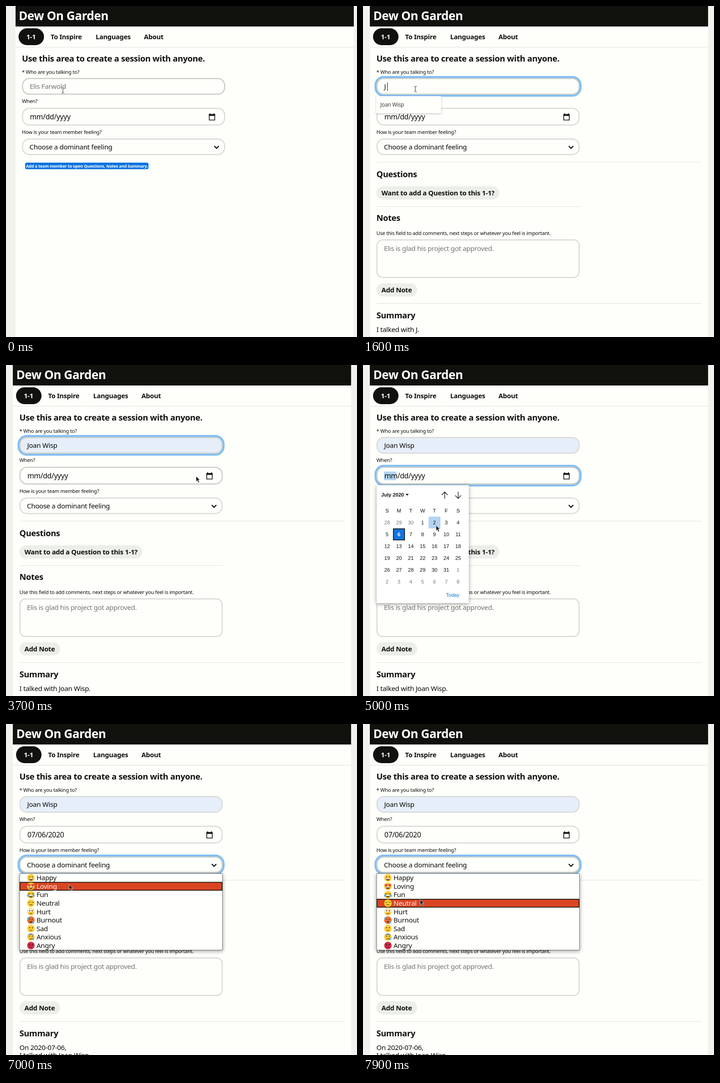
Recreate the animation shown at these times as an HTML page. Size 771 by 727 pixels, loop 8000 ms.

```html
<!DOCTYPE html>
<html lang="en">
<head>
<meta charset="utf-8">
<title>Session form</title>
<style>
html, body { margin: 0; width: 100%; height: 100%; overflow: hidden; background: #f1f1ed; }
svg { display: block; width: 100%; height: 100%; }
text { font-family: "Noto Sans", "Open Sans", sans-serif; letter-spacing: -.02em; fill: #0b0c08; white-space: pre; }
.calendar text { font-family: "Liberation Sans", Arial, sans-serif; letter-spacing: 0; text-anchor: middle; }
.popup { filter: drop-shadow(0 2px 4px rgba(0, 0, 0, .4)); }
.popup.light { filter: drop-shadow(0 1px 1.5px rgba(0, 0, 0, .3)); }
</style>
</head>
<body>
<svg id="stage" viewBox="0 0 771 727"></svg>
<script>
const LOOP = 8000, STEP = 100;
const INK = '#11120d', PAPER = '#fefffb', GREY = '#757575', LINE = '#dfe1dc', BLUE = '#0f74de';
const CRISP = 'shape-rendering="crispEdges"';
const BRAND = 'Dew On Garden', PERSON = 'Joan Wisp', SAMPLE = 'Elis Farwold';
const stage = document.getElementById('stage');

// Pointer moves: first step, last step, destination x, y
const MOVES = [
  [600, 800, 115, 182], [2300, 2600, 100, 212], [2800, 3100, 130, 232],
  [3300, 3500, 386, 236], [3700, 3700, 417, 244], [3900, 4100, 441, 244],
  [4600, 5000, 160, 352], [5100, 5300, 86, 371], [5700, 5700, 78, 366],
  [6000, 6000, 84, 367], [6100, 6100, 112, 344], [6300, 6500, 150, 309],
  [7000, 7000, 138, 352], [7100, 7400, 122, 450], [7700, 7900, 125, 385]
];

function pointerAt(t) {
  let x = 125, y = 185;
  for (const [first, last, toX, toY] of MOVES) {
    if (t < first) break;
    const p = Math.min(1, (t - first + STEP) / (last - first + STEP));
    const eased = p * (2 - p);
    x += (toX - x) * eased;
    y += (toY - y) * eased;
  }
  return { x, y };
}

const text = (x, y, size, str, attrs = '') => `<text x="${x}" y="${y}" font-size="${size}" ${attrs}>${str}</text>`;
const bold = (x, y, size, str, color = INK) => text(x, y, size, str, `font-weight="700" style="fill:${color}"`);
const label = (y, str) => text(29.5, y, 11.1, str);
const tint = color => `style="fill:${color}"`;
const rect = (x, y, w, h, fill, r = 0, extra = '') =>
  `<rect x="${x}" y="${y}" width="${w}" height="${h}" rx="${r}" fill="${fill}" ${extra}/>`;
const path = (d, stroke, width = 1, fill = 'none') =>
  `<path d="${d}" stroke="${stroke}" stroke-width="${width}" fill="${fill}"/>`;
const circle = (x, y, r, fill) => `<circle cx="${x}" cy="${y}" r="${r}" fill="${fill}"/>`;
const rule = (y, right) => rect(29.5, y, right - 29.5, 1, LINE);
const between = (v, a, b) => v >= a && v < b;

function field(top, bottom, { focus, hover, fill = PAPER, radius = 16 } = {}) {
  const h = bottom - top;
  const ring = focus ? rect(27.5, top - 2, 450.5, h + 4, 'none', radius + 2, 'stroke="#82bef4" stroke-width="4.4"') : '';
  const border = focus || hover ? '#cbcfc8' : '#dadcd6';
  return ring + rect(30.75, top + 1.25, 444, h - 2.5, fill, radius - 1, `stroke="${border}" stroke-width="2.5"`);
}

function header() {
  return rect(15, -2, 743, 731, PAPER, 0, CRISP) + rect(15, 0, 743, 45, INK, 0, CRISP) +
    bold(22.5, 31, 26.2, BRAND, '#fff') +
    rect(22, 49, 56, 37, INK, 18.5) + bold(39.2, 73, 14.6, '1-1', '#fff') +
    bold(92.5, 73, 14.6, 'To Inspire') + bold(191.5, 73, 14.6, 'Languages') + bold(297.5, 73, 14.6, 'About') +
    rect(15, 90, 743, 1, LINE, 0, CRISP) +
    bold(29.5, 122, 18.4, 'Use this area to create a session with anyone.');
}

function form(s) {
  const nameText = s.name ? text(46.5, 182, 15, s.name) : text(46.5, 182, 15, SAMPLE, tint(GREY));
  return label(149, '* Who are you talking to?') +
    field(158, 195, { focus: s.focus === 'name', hover: s.hover(158, 195), fill: s.filled ? '#e6eefa' : PAPER }) +
    nameText + (s.caret ? rect(s.caret, 168, 1, 18, INK) : '') +
    label(213, 'When?') +
    field(223.5, 262.5, { focus: s.focus === 'date', hover: s.hover(223, 262) }) +
    (s.focus === 'date' ? rect(46, 234, s.dated ? 18 : 27, 19, '#b5d5f3') : '') +
    text(47, 248.5, 15.7, s.dated ? '07/06/2020' : 'mm/dd/yyyy') +
    path('M441 238.5H453V250.5H441Z', INK, 1.6) + rect(440.2, 237.5, 13.6, 3.8, INK) +
    rect(442, 235.5, 1.6, 3, INK) + rect(450.5, 235.5, 1.6, 3, INK) +
    label(281, 'How is your team member feeling?') +
    field(291, 327.5, { focus: s.focus === 'feeling', hover: s.hover(291, 327) }) +
    text(46, 314.5, 15, 'Choose a dominant feeling') +
    path('M452 307.5L457 312.5L462 307.5', INK, 2.4);
}

function details(s) {
  const talked = `I talked with ${s.summary}.`;
  return rule(342.5, 744) + bold(29.5, 376, 18.3, 'Questions') +
    rect(29.5, 396, 270, 29, '#eceeea', 14.5) + bold(40.5, 416, 14.85, 'Want to add a Question to this 1-1?') +
    rule(440, 476) + bold(29.5, 472, 18.3, 'Notes') +
    label(502.5, 'Use this field to add comments, next steps or whatever you feel is important.') +
    field(512.5, 597.5, { radius: 13 }) +
    text(46, 537.5, 15, 'Elis is glad his project got approved.', tint(GREY)) +
    rect(29.5, 609, 89.5, 29, '#eceeea', 14.5) + bold(40.5, 629, 14.85, 'Add Note') +
    rule(653, 744) + bold(29.5, 685.5, 18.3, 'Summary') +
    (s.dated ? text(29.5, 716, 15, 'On 2020-07-06,') + text(29.5, 733, 15, talked) : text(29.5, 716, 15, talked));
}

function suggestion(active) {
  return `<g class="popup light">${rect(29, 198, 143, 38, '#fffffc', 1)}</g>` +
    (active ? rect(29, 202, 143, 30, '#e8e9e6') : '') +
    text(38, 220.5, 11.8, PERSON, 'font-weight="500" style="fill:#3c3d3a"');
}

function calendar(p) {
  const hoverCol = Math.floor((p.x - 40) / 26), hoverRow = Math.floor((p.y - 333) / 26);
  let out = `<g class="popup">${rect(30, 264, 202.5, 259, '#fff', 1)}</g><g class="calendar">` +
    bold(65, 289, 11.1, 'July 2020') + path('M93.5 283H100.5L97 287Z', 'none', 0, INK) +
    path('M179.5 293.5V279M173 285.5L179.5 279L186 285.5M209 278.5V293M202.5 286.5L209 293L215.5 286.5', INK, 1.3);
  [...'SMTWTFS'].forEach((day, i) => out += text(53 + 26 * i, 324, 11.3, day));
  for (let i = 0; i < 42; i++) {
    const col = i % 7, row = Math.floor(i / 7), x = 53 + 26 * col, y = 346 + 26 * row;
    const date = new Date(2020, 5, 28 + i), today = i === 8;
    if (today) out += rect(x - 12.3, y - 12.3, 24.6, 24.6, BLUE, 0, 'stroke="#11120d" stroke-width="1.6"');
    else if (col === hoverCol && row === hoverRow) out += rect(x - 13, y - 13, 26, 26, '#b3d4f1');
    out += today ? bold(x, y + 4, 11.3, date.getDate(), '#fff')
      : text(x, y + 4, 11.3, date.getDate(), tint(date.getMonth() === 6 ? INK : GREY));
  }
  return out + text(197, 508.5, 11.1, 'Today', tint('#0f72cc')) + '</g>';
}

// Face details are drawn around (0, 0) inside a circle of radius 8.3.
const BROWN = '#6b4415';
const eyes = circle(-3, -2, 1.3, BROWN) + circle(3, -2, 1.3, BROWN);
const grin = path('M-5 1H5Q4 6 0 6Q-4 6 -5 1Z', 'none', 0, BROWN) + rect(-4, 1, 8, 1.8, '#fff');
const shutEyes = path('M-6 -2H-1.5M1.5 -2H6', BROWN, 1.3);
const frown = path('M-3 5Q0 2 3 5', BROWN, 1.3);
const heart = x => path(`M${x} 1L${x - 3.4} -2.6Q${x - 3} -6 ${x} -4Q${x + 3} -6 ${x + 3.4} -2.6Z`, 'none', 0, '#e5354b');
const drop = (x, y) => `<ellipse cx="${x}" cy="${y}" rx="1.9" ry="2.8" fill="#50b5ee"/>`;
const FEELINGS = [
  ['Happy', '#ffcf36', eyes + grin],
  ['Loving', '#ffc634', grin + heart(-4) + heart(4)],
  ['Fun', '#ffcc36', shutEyes + grin + drop(-6.5, 2) + drop(6.5, 2)],
  ['Neutral', '#ffcf36', shutEyes + path('M-3.5 3.5H3.5', BROWN, 1.4)],
  ['Hurt', '#ffcc40', path('M-7.5 -3L6 -7M-8 0L8 -2', '#f1efe6', 3) + eyes + frown],
  ['Burnout', '#ef6b2e', eyes + rect(-3, 2, 6, 3.5, BROWN, 1.5) + drop(5, 5) + drop(-6, -4)],
  ['Sad', '#ffcf36', eyes + frown],
  ['Anxious', '#ffcc36', path('M-7 -4Q0 -12 7 -4Q0 -6 -7 -4Z', 'none', 0, '#6293c9') + eyes + frown + drop(5, 3.5)],
  ['Angry', '#d42f48', path('M-6 -4L-1.5 -2M6 -4L1.5 -2', '#59152a', 1.4) + circle(-3, -.5, 1.2, '#59152a') + circle(3, -.5, 1.2, '#59152a') + path('M-3 4.5Q0 2 3 4.5', '#59152a', 1.4)]
];

function feelings(p) {
  const rowHeight = 18.6, active = Math.floor((p.y - 328.5) / rowHeight);
  let out = `<g class="popup">${rect(30, 328.5, 445.5, 168, '#fffffe', 0, 'stroke="#777"')}</g>`;
  FEELINGS.forEach(([name, color, face], i) => {
    const top = 328.5 + rowHeight * i, on = i === active;
    if (on) out += rect(30.7, top + .5, 443.8, 17.6, '#d94522', 0, 'stroke="#11120d" stroke-width="1.6"');
    out += `<g transform="translate(54.7 ${top + 9.3})">${circle(0, 0, 8.3, color)}${face}</g>` +
      text(67, top + 14.6, 15, name, tint(on ? '#fbeee8' : INK));
  });
  return out;
}

function pointer(p, typing) {
  const beam = 'M-3 -5.5H-1L0 -4.5L1 -5.5H3M0 -4.5V5.5M-3 6.5H-1L0 5.5L1 6.5H3';
  const shape = typing
    ? path(beam, '#fff', 2.4) + path(beam, '#222', 1)
    : path('M.5 .5V12L3.2 9.4L5.4 14.2L7.6 13.2L5.4 8.6H9Z', '#d0d0ce', .9, '#1c1c1a');
  return `<g transform="translate(${p.x} ${p.y})">${shape}</g>`;
}

function render(t) {
  const p = pointerAt(t), open = t >= 1500;
  const calendarOpen = between(t, 4300, 5500);
  const s = {
    focus: t < 700 ? '' : t < 4100 ? 'name' : t < 6500 ? 'date' : 'feeling',
    name: t < 1500 ? '' : t < 1900 ? 'J' : t < 2600 ? 'Jo' : PERSON,
    summary: t < 1900 ? 'J' : t < 2900 ? 'Jo' : PERSON,
    caret: between(t, 1500, 1900) ? 53 : between(t, 1900, 2300) ? 61 : between(t, 2900, 3300) ? 115 : 0,
    filled: t >= 2600,
    dated: t >= 5500,
    hover: (top, bottom) => !calendarOpen && between(p.y, top, bottom) && between(p.x, 30, 476)
  };
  const badge = rect(36.5, 344, 271, 14.5, BLUE, 3.5) +
    bold(38.5, 355.3, 9.1, 'Add a team member to open Questions, Notes and Summary.', '#fff');
  const suggesting = between(t, 800, 1500) || between(t, 1600, 2900);
  // The page moves left once the longer form adds a scrollbar.
  stage.innerHTML = `<g transform="translate(${open ? 0 : 5.5} 0)">` +
    header() + form(s) + (open ? details(s) : badge) +
    (suggesting ? suggestion(t >= 2600) : '') +
    (calendarOpen ? calendar(p) : '') +
    (t >= 6600 ? feelings(p) : '') + '</g>' +
    pointer(p, t < 2300);
}

let shown = -1;
function tick(now) {
  const t = Math.floor((now % LOOP) / STEP) * STEP;
  if (t !== shown) render(shown = t);
  requestAnimationFrame(tick);
}
render(0);
requestAnimationFrame(tick);
</script>
</body>
</html>
```
